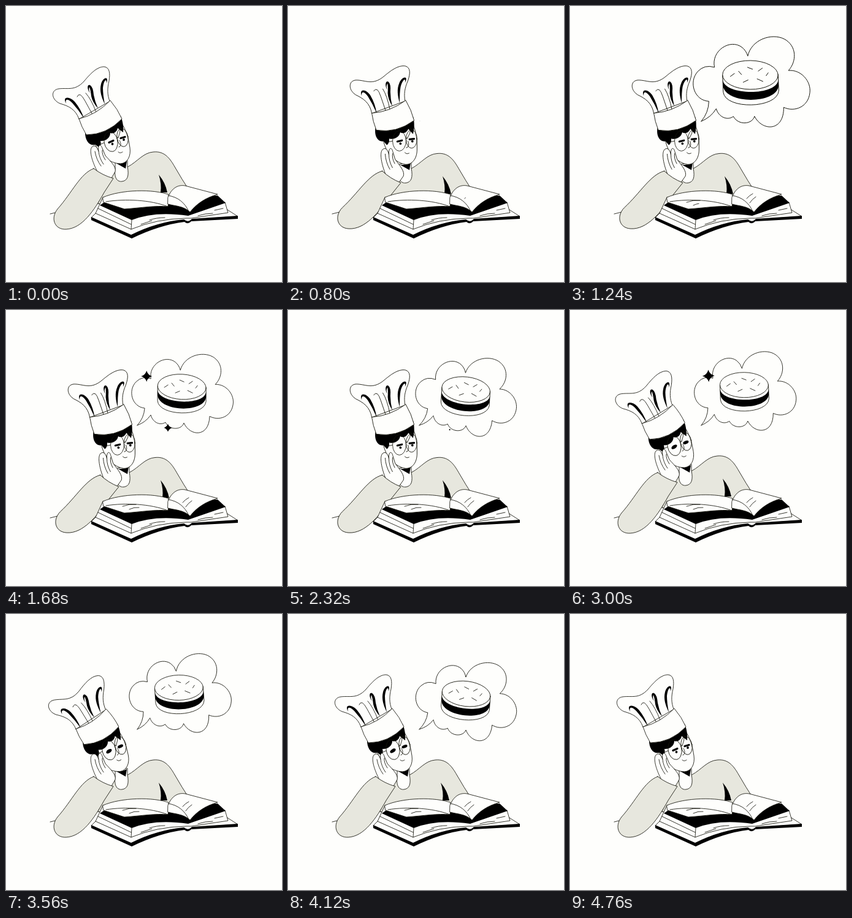
Recreate the animation shown at these times as an HTML page. Size 450 by 450 pixels, loop 4800 ms.

```html
<!DOCTYPE html>
<html lang="en">
<head>
<meta charset="utf-8">
<title>Daydreaming chef</title>
<style>
  html, body { margin: 0; width: 100%; height: 100%; overflow: hidden; background: #fefefc; }
  svg { display: block; width: 100%; height: 100%; }
  .line, .paper, .wool { stroke: #15150c; stroke-width: .85; stroke-linejoin: round; stroke-linecap: round; }
  .line { fill: none; }
  .paper { fill: #fefefc; }
  .wool { fill: #e7e7de; }
  .ink { fill: #000; }
</style>
</head>
<body>
<svg viewBox="0 0 450 450">
  <path class="line" d="M72 339L84 336"/>

  <g id="body">
    <path class="wool" d="M150 322L165 284L178 264L199 262C214 254 224 239 240 238C258 236 267 248 275 262Q287 283 299 301L290 330Z"/>
    <path class="ink" d="M249 275Q260 288 263 304L252 304Q254 290 249 275Z"/>
    <path class="paper" d="M178 256L178 266C176 281 182 287 189 286C198 285 201 277 198 262L198 252Z"/>
    <path class="ink" d="M179 256Q188 258 197 253L195 265Z"/>
  </g>

  <g id="head">
    <path class="paper" d="M144 220C148 239 167 257 187 257C198 256 204 245 202 231Q199 207 188 190L145 208Z"/>
    <path class="ink" d="M129 207C129 219 136 229 146 226L152 231Q156 227 154 220C162 221 170 215 170 207C176 209 181 205 182 199L191 206C192 196 190 187 187 179L158 188Z"/>
    <path class="line" d="M186 197Q187 206 183 215M185 219C188 224 188 229 184 230M183 238Q186 241 190 238M153 226L160 223M181 215L183 214"/>
    <ellipse class="line" cx="171" cy="221" rx="11" ry="16.5" transform="rotate(-10 171 221)"/>
    <ellipse class="line" cx="190" cy="214.500" rx="9" ry="15" transform="rotate(-10 190 214)"/>
    <g id="open">
      <path d="M168 222.500L175 219.500M187 215.500L194 213.500" stroke="#000" stroke-width="3.200" stroke-linecap="round"/>
      <circle class="ink" cx="173.500" cy="225" r="1.900"/><circle class="ink" cx="192" cy="218" r="1.900"/>
    </g>
    <g id="closed">
      <ellipse class="ink" cx="171" cy="223" rx="5.200" ry="2.800" transform="rotate(-32 171 223)"/>
      <ellipse class="ink" cx="190" cy="216" rx="4.800" ry="2.500" transform="rotate(-22 190 216)"/>
    </g>
    <path class="paper" d="M119 184C113 168 102 163 88 159C74 153 72 137 86 135C101 133 112 139 127 123C137 111 148 99 160 99C169 100 170 110 168 122C165 135 165 144 169 155Z"/>
    <path class="ink" d="M98 159C91 147 104 147 112 156Q122 168 127 183Q118 169 108 158C101 151 96 151 98 159ZM137 142C131 134 133 127 137 129Q142 132 143 145Q145 156 150 167Q141 157 139 147Q138 137 136 132Q134 136 137 142ZM164 126C168 113 158 116 155 127C152 139 156 149 161 160Q158 144 158 134C159 122 164 116 164 126Z"/>
    <path class="line" d="M116 148Q120 138 129 155L141 177M130 142Q139 152 147 173"/>
    <path class="paper" d="M119 184Q148 177 170 154Q182 168 189 184Q164 210 131 210Q123 197 119 184Z"/>
  </g>

  <g id="arm">
    <path class="paper" d="M149 270C141 255 135 236 140 230C145 225 149 231 151 237C149 227 154 223 157 232L162 244C171 254 180 262 178 270L170 284Z"/>
    <path class="line" d="M151 237Q152 248 159 258M145 237Q147 250 155 261M157 235Q156 242 162 251"/>
    <path class="wool" d="M143 265C121 273 108 304 84 331C72 346 79 365 98 364C124 363 144 333 160 304L175 281Q157 276 143 265Z"/>
  </g>

  <g id="book">
    <path class="paper" d="M139 345L150 334L359 331L378 343L303 348L297 353L291 349Q248 353 204 374Z"/>
    <path class="ink" d="M139 344L204 373Q246 352 290 348Q297 354 303 347L378 342L378 347L302 351Q297 357 291 352Q250 357 205 379L139 349Z"/>
    <path class="paper" d="M158 312L146 338L204 364Q245 347 294 346L302 346L362 337L357 320L300 312Z"/>
    <path class="ink" d="M153 325L163 318L200 330L262 324L268 312L345 309L358 321L297 342Q242 334 205 349Z"/>
    <path class="paper" d="M158 312C188 299 240 298 267 308L264 327C245 325 220 329 193 331L159 320Z"/>
    <path class="line" d="M163 319C195 314 235 316 264 327M205 349L204 364M150 330L204 356M234 349Q245 345 259 345M220 356L238 350M313 342Q325 338 337 338M340 333L354 330"/>
    <path class="paper" d="M264 312C270 297 280 291 292 293L345 307C325 313 311 322 300 336C290 326 275 326 264 323Z"/>
    <path class="line" d="M264 309C280 311 292 321 298 335"/>
    <g id="text">
      <path class="line" pathLength="1" d="M288 314Q292 309 298 306"/>
      <path class="line" pathLength="1" d="M293 321Q297 315 303 311"/>
      <path class="line" pathLength="1" d="M190 320Q201 316 212 317"/>
      <path class="line" pathLength="1" d="M201 325Q209 321 217 322"/>
    </g>
  </g>

  <g id="bubble">
    <path class="paper" d="M214 188Q225 176 226 160C205 158 198 131 212 117Q222 107 236 112C232 88 260 72 276 85Q282 90 284 98C290 75 319 66 337 76C355 87 353 109 341 121C359 120 373 138 370 154C367 174 347 181 332 173C331 208 300 206 290 184C286 196 266 196 260 183C251 189 239 183 236 171Q228 183 214 188Z"/>
    <path class="paper" d="M247 124L247 148C249 173 323 175 326 149L326 126Z"/>
    <path class="ink" d="M247 130C248 153 324 157 326 133L326 142C323 168 250 166 247 139Z"/>
    <ellipse class="paper" cx="286.500" cy="125" rx="39.500" ry="20.500" transform="rotate(3 286 125)"/>
    <path class="line" d="M258 126L264 122M270 119L274 124M283 114L290 117M298 120L304 116M276 135L283 132M296 131L304 135M309 127L312 123"/>
    <path id="star1" class="ink" d="M0-9Q2-2 9 0Q2 2 0 9Q-2 2-9 0Q-2-2 0-9Z"/>
    <path id="star2" class="ink" d="M0-7Q2-2 7 0Q2 2 0 7Q-2 2-7 0Q-2-2 0-7Z"/>
  </g>
</svg>
<script>
const LOOP = 4800;
const el = id => document.getElementById(id);
const move = (id, transform) => el(id).setAttribute('transform', transform);
const show = (id, on) => el(id).style.display = on ? '' : 'none';
const clamp = u => Math.max(0, Math.min(1, u));
const ease = u => u * u * (3 - 2 * u);

// Eased value through [time, value] keys.
function track(t, keys) {
  let [t0, v0] = keys[0];
  for (const [t1, v1] of keys) {
    if (t < t1) return t1 === t0 ? v0 : v0 + (v1 - v0) * ease((t - t0) / (t1 - t0));
    [t0, v0] = [t1, v1];
  }
  return v0;
}
const pulse = (t, mid, half) =>
  Math.abs(t - mid) < half ? Math.sqrt(Math.cos((t - mid) / half * Math.PI / 2)) : 0;

const tilt = [[60, 0], [600, 9.8], [2340, 9.8], [2800, 0], [3400, -3.8], [3950, 0]];
const pop = [[780, 0], [1140, 1.24], [1400, .96], [1600, 1], [4300, 1], [4460, 1.04], [4720, 0]];
const lines = [...el('text').children];

function draw(t) {
  const angle = track(t, tilt), lean = Math.max(0, angle / 9.8);
  move('head', `rotate(${angle} 182 282)`);
  move('arm', `translate(${3 * lean} ${-lean}) rotate(${5.7 * lean} 96 345)`);
  move('body', `translate(${3 * lean} ${2.5 * lean})`);

  const asleep = t > 2640 && t < 4580;
  show('open', !asleep);
  show('closed', asleep);

  lines.forEach((line, i) => {
    const drawn = clamp((t - 760 - i * 110) / 260);
    line.style.strokeDasharray = `${drawn} 2`;
    line.style.visibility = drawn ? 'visible' : 'hidden';
  });

  const size = track(t, pop);
  const sway = 5 * Math.sin((165 + (t - 1680) * .41) * Math.PI / 180) - 1.1;
  show('bubble', size > .01);
  move('bubble', `translate(214 188) rotate(${sway}) scale(${size}) translate(-214 -188)`);
  move('star1', `translate(229 108) scale(${pulse(t, 1720, 440) + 1.1 * pulse(t, 3000, 440)})`);
  move('star2', `translate(264 192) scale(${pulse(t, 1860, 475)})`);
}

function frame() {
  draw(performance.now() % LOOP);
  requestAnimationFrame(frame);
}
frame();
</script>
</body>
</html>
```
